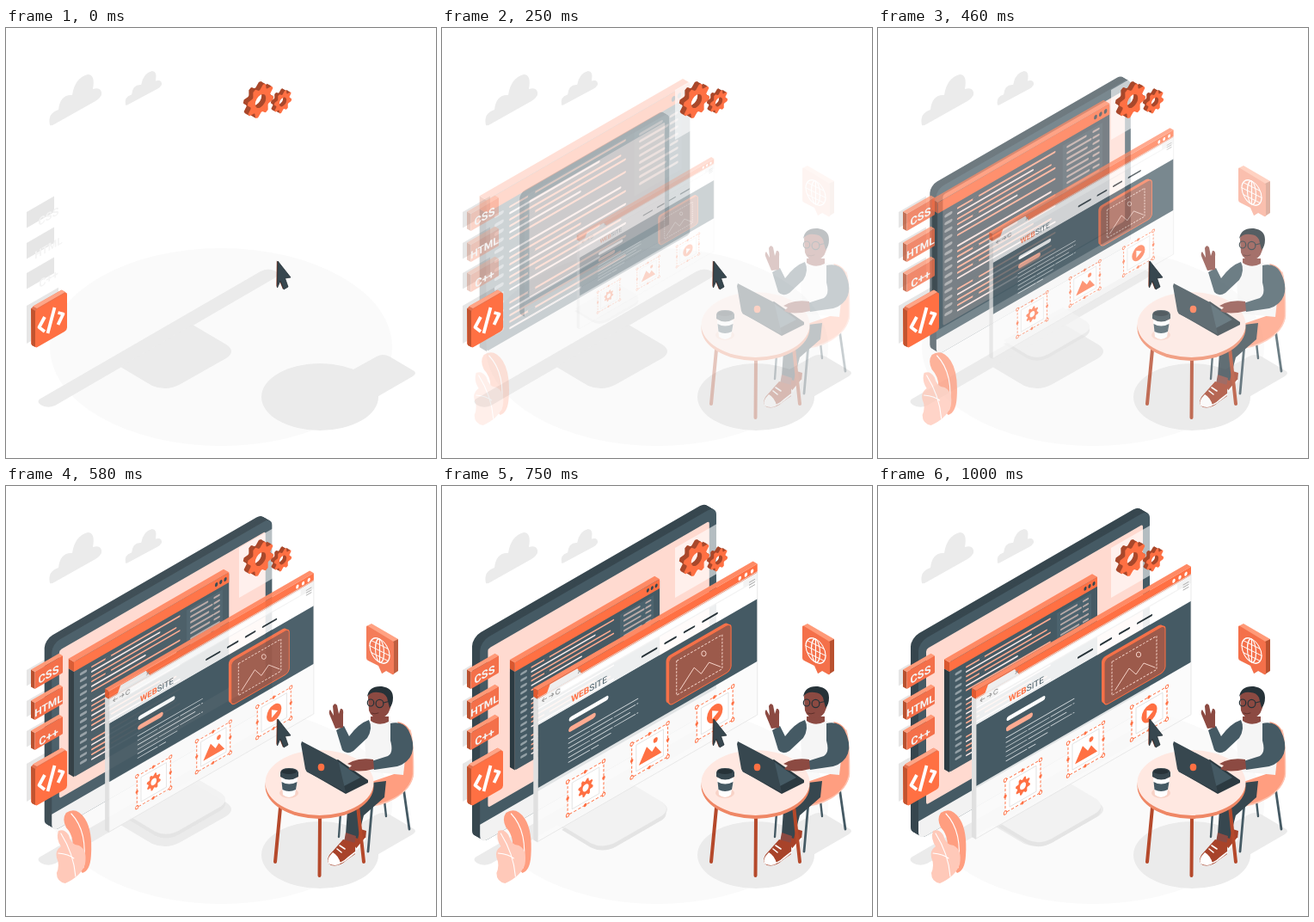
Write an HTML page that moves like this. It is 500x500 px and loops after 1.04 s.

```html
<!DOCTYPE html>
<html lang="en">
<head>
<meta charset="utf-8">
<title>Website building</title>
<style>
html, body { margin: 0; width: 100%; height: 100%; overflow: hidden; background: #fff; }
svg { display: block; width: 100vw; height: 100vh; }
text { font-family: Roboto, Arial, sans-serif; font-weight: 700; }
</style>
</head>
<body>
<svg id="stage" viewBox="0 0 500 500"></svg>
<script>
const ORANGE = '#ff7043', RUST = '#b5492b', PEACH = '#ffab91', DARK = '#37474f', SLATE = '#455a64',
      SKIN = '#8c4a42', SHADE = '#ebebeb', SLOPE = 0.577;

const path = (d, fill, extra = '') => `<path d="${d}" fill="${fill}" ${extra}/>`;
const line = (d, stroke, width, extra = '') =>
  path(d, 'none', `stroke="${stroke}" stroke-width="${width}" stroke-linecap="round" stroke-linejoin="round" ${extra}`);
const rect = (x, y, w, h, fill, extra = '') =>
  `<rect x="${x}" y="${y}" width="${w}" height="${h}" fill="${fill}" ${extra}/>`;
const oval = (x, y, rx, ry, fill, extra = '') =>
  `<ellipse cx="${x}" cy="${y}" rx="${rx}" ry="${ry}" fill="${fill}" ${extra}/>`;
const group = (id, body) => `<g id="${id}">${body}</g>`;
const move = (x, y, body) => `<g transform="translate(${x} ${y})">${body}</g>`;
// Places a flat drawing on the wall that rises to the right.
const wall = (x, y, body) => `<g transform="matrix(1 ${-SLOPE} 0 1 ${x} ${y})">${body}</g>`;

// Left side and top of a block whose front face starts at x, y.
function edges(x, y, w, h, d, side, top) {
  const k = d * SLOPE, up = w * SLOPE;
  return path(`M${x} ${y}l${-d} ${-k}v${h}l${d} ${k}z`, side) +
         path(`M${x} ${y}l${-d} ${-k}l${w} ${-up}l${d} ${k}z`, top);
}

// Stacks copies of a shape to give it depth.
function extrude(x, y, depth, shape) {
  let out = '';
  for (let i = depth; i >= 0; i--) out += shape(x - i, y - i * SLOPE, i === 0);
  return out;
}

function gearPath(R) {
  let d = '';
  for (let i = 0; i < 32; i++) {
    const r = i % 4 < 2 ? R : R * 0.74;
    const a = (i + 0.9 + [0.1, 0.1, 0.2, -0.2][i % 4]) * Math.PI / 16;
    d += (i ? 'L' : 'M') + (r * Math.cos(a)).toFixed(2) + ' ' + (r * Math.sin(a)).toFixed(2);
  }
  const h = R * 0.4;
  return `${d}ZM${h} 0A${h} ${h} 0 1 0 ${-h} 0A${h} ${h} 0 1 0 ${h} 0Z`;
}
const gear = (x, y, R, depth) => extrude(x, y, depth, (gx, gy, front) =>
  `<g transform="matrix(.866 -.5 0 1 ${gx} ${gy})">${path(gearPath(R), front ? ORANGE : '#a9482b', 'fill-rule="evenodd"')}</g>`);

function backdrop() {
  const cloud = path('M51 113Q48 99 61 95Q63 77 77 78Q80 58 95 54Q104 54 101 71Q112 68 111 78Q109 82 104 85L56 112Q53 114 51 113Z', SHADE);
  return oval(250, 371, 199, 115, '#fafafa') +
    path('M40 431L296 283Q305 278 314 283Q318 287 312 291L57 439Q48 443 40 438Q35 434 40 431Z', SHADE) +
    path('M133 394L217 345L256 368Q268 376 256 384L203 414Q187 423 170 416Z', SHADE) +
    oval(365, 429, 68, 39, SHADE) +
    path('M402 398L431 382Q438 378 446 382L473 398Q479 401 473 405L428 431Z', SHADE) +
    cloud + `<g transform="translate(139 50) scale(.7 .67) translate(-51 -54)">${cloud}</g>` +
    [214, 250, 285].map(y => wall(24, y, rect(0, 0, 32, 18.5, '#e6e6e6'))).join('') +
    wall(24, 323, rect(0, 0, 37, 44, '#e6e6e6'));
}

function monitor() {
  const foot = 'M140 391L222 345L254 364Q264 372 254 380L202 410Q187 418 173 411Z';
  return move(0, 5, path(foot, '#e4e4e4')) + path(foot, '#f2f2f2') +
    extrude(47, 182, 9, (x, y, front) => wall(x, y, rect(0, 0, 269, 230, front ? SLATE : DARK, 'rx="10"'))) +
    wall(47, 182,
      path('M0 208H269V220Q269 230 259 230H10Q0 230 0 220Z', '#f2f2f2') +
      rect(9, 13, 252, 181, '#ffdad0', 'rx="3"'));
}

function codeWindow() {
  let body = rect(0, 0, 172, 128, SLATE, 'rx="2"') + rect(0, 0, 172, 11, ORANGE) +
    rect(125, 15, 40, 54, '#546e7a', 'opacity=".45"');
  for (let y = 18; y < 122; y += 7.6) body += line(`M8 ${y}h5`, '#93a0a6', 3);
  for (let i = 0; i < 20; i++) {
    const y = 17 + i * 5.4, w = 97 - [0, 22, 4, 0, 38][i % 5];
    if (i % 8 === 6) continue;
    body += line(`M20 ${y}h${w}`, i % 3 === 1 ? '#fbe9e7' : PEACH, 1.8);
    if (i % 3 === 0) body += line(`M36 ${y}h4`, SLATE, 2.4);
  }
  for (let i = 0; i < 8; i++) {
    const y = 19 + i * 6;
    body += line(`M130 ${y}h${18 + i * 5 % 9}M156 ${y}h5`, '#b9aaa8', 2.2);
  }
  body += [158, 163, 168].map(x => oval(x, 5.5, 1.6, 2.2, DARK)).join('');
  return edges(83, 205, 172, 11, 6, '#d9572f', '#ff8a65') +
    path('M77 212.5L83 216V333L77 329.5Z', '#2c3a41') + wall(83, 205, body);
}

function selection(x, y, icon) {
  const dots = [[0, 0], [41, 0], [0, 38], [41, 38]].map(([a, b]) =>
    oval(a, b, 1.7, 1.9, '#fff', `stroke="${ORANGE}"`)).join('');
  const ticks = [[20, 0], [20, 38], [0, 19], [41, 19]].map(([a, b]) => oval(a, b, 1.7, 1.9, ORANGE)).join('');
  return wall(x, y, rect(0, 0, 41, 38, '#fff', `stroke="${ORANGE}" stroke-dasharray="3 2"`) +
    rect(5, 4, 31, 30, 'none', 'stroke="#ddd" stroke-width=".7"') + dots + ticks + icon);
}

function photoCard() {
  return extrude(263, 202, 3, (x, y, front) =>
      wall(x, y, rect(0, 0, 71, 54, front ? '#9c5a4b' : '#f4714a', `rx="5" ${front ? `stroke="${ORANGE}"` : ''}`))) +
    wall(264, 202, rect(8, 7, 52, 39, 'none', 'stroke="#ffe0d6" stroke-width=".9" stroke-dasharray="2.5 1.5"')) +
    line('M276 237L292 212L300 219L309 206L322 211', '#ffe0d6', 0.9) +
    oval(303, 196, 2.6, 3, 'none', 'stroke="#ffe0d6" stroke-width=".9"');
}

function website() {
  const w = 250;
  let page = rect(0, 9, w, 31, '#fff', 'opacity=".9"') + rect(0, 110, w, 62, '#fbfbfb', 'opacity=".86"') +
    rect(0, 0, w, 10, ORANGE) + path('M10 10L14 1H45L50 10Z', '#eee') +
    rect(0, 10, w, 9, '#f3f3f3') + rect(26, 11.5, 208, 6, '#fff') + rect(0, 40, w, 71, SLATE) +
    line('M46 4l3 3m0-3l-3 3', '#888', 0.7) +
    line('M5 14.5h5m-5 0l2-2m-2 2l2 2M13 14.5h5m-2-2l2 2l-2 2M25 13a2.4 2.6 0 1 0 0 3', '#999', 0.9) +
    [230, 237, 244].map(x => oval(x, 5, 1.7, 2.3, '#fff')).join('') +
    [22, 25, 28].map(y => line(`M241 ${y - 6}h6`, '#aaa', 1)).join('') +
    `<text x="38" y="35.5" font-size="10" fill="${ORANGE}">WEB<tspan fill="${SLATE}" font-weight="400">SITE</tspan></text>` +
    [[119, 16], [145, 12], [167, 11], [188, 16]].map(([x, l]) => line(`M${x} 30h${l}`, '#263238', 2.2)).join('') +
    line('M38 54h40', '#fff', 5) + line('M38 65.5h25', PEACH, 6);
  for (let i = 0; i < 6; i++)
    page += line(`M35 ${75 + i * 5.4}h${[79, 79, 70, 79, 48, 34][i]}`, '#d5dbde', 0.9, i % 2 ? 'stroke-dasharray="24 2"' : '');
  const smallGear = `<g transform="translate(20.5 18.5) scale(.87 1)">${path(gearPath(10), ORANGE, 'fill-rule="evenodd"')}</g>`;
  const hills = path('M8 29L17 13L23 22L27 18L34 29Z', ORANGE) + oval(27, 11, 2.5, 2.8, ORANGE);
  const play = oval(20.5, 19, 9, 10, ORANGE) + path('M17.5 14L25 19L17.5 24Z', '#fff');
  return edges(114, 238, w, 10, 5, '#e0592f', '#ff8a65') +
    path('M109 245L114 248V411L109 408Z', '#e0e0e0') +
    wall(114, 238, page) + wall(114, 238, rect(0, 9, w, 163, 'none', 'stroke="#e4e4e4" stroke-width=".7"')) +
    photoCard() + selection(148, 342, smallGear) + selection(221, 299, hills) + selection(295, 257, play);
}

const label = (x, y, size, words) =>
  wall(x, y, `<text font-size="${size}" fill="#f4f4f4" text-anchor="middle">${words}</text>`);

function tags() {
  return [216, 252, 287].map(y => edges(33.5, y, 32.5, 20, 4.5, '#b9512f', '#ff9a78') +
    wall(33.5, y, rect(0, 0, 32.5, 20, '#f4704a', 'rx="1"'))).join('');
}
const labels = () => label(49.5, 223.5, 12.8, 'CSS') + label(49.5, 259.5, 12, 'HTML') + label(49.5, 296, 12.8, 'C++');

function tile() {
  return extrude(34, 328, 5, (x, y, front) => wall(x, y, rect(0, 0, 37, 44.5, front ? ORANGE : '#e2714f', 'rx="3"'))) +
    path('M29 326L34 329V371L30 369Z', '#c2532f') + path('M31 323.5L65 304.5L69 307L36 326Z', '#ffa486') +
    line('M45 336L38.5 348L45 353M56.5 325L48.5 355M60.5 331L66.5 332.5L60.5 345', '#fff', 3.8, 'style="stroke-linecap:butt"');
}

function furniture() {
  return line('M440 366L442 384M389 380L387 408', SLATE, 2.4) +
    line('M426 368L421 425M462 350L469 399', SLATE, 2.8) +
    path('M455 274Q468 276 472 290L474 335Q472 352 452 363Q436 373 418 372L422 345L460 332L466 292Z', '#ff9e80') +
    line('M470 284Q474 300 473.5 335Q471 352 452 363Q436 372 420 372', '#ffc4b1', 1.5);
}

function person() {
  return path('M403 396L419 401L418 411L408 422L402 414Z', '#a8432a') + line('M418 410L408 422', '#fff', 2) +
    path('M442 343L410 347Q400 352 398 362L395 405L409 410L416 383L440 362Z', DARK) +
    path('M395 403L407 407L405 417L393 414Z', SKIN) +
    path('M392 411L376 429Q371 438 378 441Q388 443 396 435L406 428V415Z', '#a8432a') +
    path('M380 426Q372 434 375 439Q383 443 389 439Q387 430 380 426Z', '#fff') +
    line('M375 438Q388 442 397 433L406 426M388 418l6 4m-9 0l5 4', '#fff', 1.6) +
    path('M418 280Q428 270 444 272Q464 277 466 300L462 336L420 332Q416 300 418 280Z', '#f5f5f5') +
    path('M422 272Q427 282 420 293L404 308Q396 313 391 307L384 284L393 279L399 291Q410 276 422 272Z', SLATE) +
    path('M383 282L378 270Q374 262 377 260L381 267L380 256Q382 251 385 255L387 265L389 259Q393 258 392 266L392 281Z', SKIN) +
    path('M424 268H445V274Q434 280 424 273Z', SKIN) +
    path('M421 246Q421 236 434 236Q449 238 448 252Q447 266 437 270Q425 271 422 261Z', SKIN) +
    path('M420 245Q422 232 437 233Q450 235 450 246Q450 254 446 258L443 246Q440 240 433 240Q424 239 420 245Z', '#263238') +
    oval(424, 252, 3.7, 4, 'none', 'stroke="#263238" stroke-width="1.2"') +
    oval(434.5, 253, 4.4, 4.6, 'none', 'stroke="#263238" stroke-width="1.2"') +
    line('M439 252L447 250', '#263238', 1.2) + line('M425 264Q429 266 433 264', '#5e2f2a', 1);
}

function table() {
  return line('M319 374L313 437M409 372L416 437M365 384L364.5 453', RUST, 4) +
    oval(364.5, 349, 63, 38, '#ef8765') + oval(364.5, 345, 63, 38, '#ffe8e1') +
    oval(329, 357, 11, 6, '#f8d2c6') +
    path('M320 340L322 359Q329 365 336 359L339 340Z', '#fff') +
    path('M320.5 344Q329 349 338.5 344L337 353Q329 357 321.5 353Z', SLATE) +
    path('M319 333Q320 328 329 328Q339 328 340 333V338Q329 345 319 338Z', DARK) + oval(329, 332, 9, 3, '#263238') +
    path('M350 332L386 318L421 342V345L395 358Z', '#2c3a41') + path('M365 331L387 321L412 339L393 349Z', SLATE) +
    path('M344 297L384 318Q386 319 387 322L395 356L351 333Q349 332 348 329L343 300Z', DARK) +
    oval(366.5, 327, 3.8, 4.2, ORANGE) +
    path('M447 276Q462 273 468 284Q476 299 472 311Q468 322 455 326L428 330L425 320L444 314Q451 310 447 296Z', SLATE) +
    path('M427 318Q413 316 403 320L397 323L402 325L398 329Q408 334 428 329Z', SKIN);
}

function bubble() {
  const globe = oval(0, 0, 11.5, 13.5, 'none') + oval(0, 0, 5, 13.5, 'none') +
    line('M-11.5 0H11.5M0 -13.5V13.5M-9.5 -7H9.5M-9.5 7H9.5', '#fff', 1.2);
  return path('M419 163L425 160L456 178L450 182Z', '#ff9a78') +
    path('M450 181L456 178V215L450 219Z', '#b9512f') + path('M437 218L443 214L438 211Z', RUST) +
    path('M419 164Q419 162 421 163L449 180Q451 181 451 183V218Q451 220 449 219L442 215L437 218L433 209L421 203Q419 202 419 200Z', '#f4704a') +
    `<g transform="matrix(1 .5 0 1 434.5 191.5)" stroke="#fff" stroke-width="1.2">${globe}</g>`;
}

function plant() {
  return path('M73 380Q85 372 95 387Q104 401 102 430Q101 447 92 450L77 432Q86 411 73 397Q68 387 73 380Z', '#ff9e80') +
    line('M79 381Q99 402 93 444', '#fff', 1.1) +
    path('M64 401Q71 398 76 406Q79 418 88 418Q98 423 95 440Q90 454 72 462Q62 460 62 450Q66 441 62 432Q60 424 67 419Q61 410 64 401Z', '#ffc9b9') +
    line('M67 404Q82 428 84 454M64 427Q76 428 82 433', '#fff', 1.1);
}

function cursor() {
  const shape = 'M316 271L331 290L324.5 291L328 301L323 304L319 294L315.5 302Z';
  return move(-1.2, -0.6, path(shape, '#8a4430')) + path(shape, DARK, 'stroke="#263238" stroke-width=".8"');
}

const stage = document.getElementById('stage');
stage.innerHTML = backdrop() + group('screen', monitor()) + group('code', codeWindow()) +
  wall(271, 72, rect(0, 0, 50, 58, '#fff', 'opacity=".6"')) +
  group('tags', tags()) + labels() + tile() + group('site', website()) +
  gear(296, 85, 18, 5) + gear(322, 86, 12, 4) + cursor() +
  group('plant', plant()) + group('desk', furniture() + person() + table()) + group('bubble', bubble());

const part = Object.fromEntries(['screen', 'code', 'site', 'tags', 'plant', 'desk', 'bubble']
  .map(id => [id, document.getElementById(id)]));

const LOOP = 1040, STEP = 41.6, PEAK = 765;
const clamp = v => Math.max(0, Math.min(1, v));
const ease = v => (1 - Math.cos(Math.PI * clamp(v))) / 2;
const zoom = (el, s, x, y) =>
  el.setAttribute('transform', `translate(${x} ${y}) scale(${s}) translate(${-x} ${-y})`);

function draw(now) {
  // Motion runs at 24 pictures a second.
  const t = Math.min(24, Math.floor((now % LOOP + 3) / STEP)) * STEP;
  const p = ease(t / PEAK);
  const s = 0.5 + 0.522 * p - 0.022 * ease((t - PEAK) / (1000 - PEAK));
  zoom(part.screen, s, 177.5, 218);
  zoom(part.code, 2 - s, 166, 218);
  zoom(part.site, s, 236.5, 249);
  part.plant.setAttribute('transform', `translate(${-65 * (1 - s)} 0)`);
  for (const el of [part.screen, part.code, part.site]) el.style.opacity = clamp(p * 1.1);
  for (const el of [part.tags, part.desk, part.plant]) el.style.opacity = clamp(p * 1.2);
  part.bubble.style.opacity = clamp((t / 600) ** 3);
}

const start = performance.now();
function tick() {
  draw(performance.now() - start);
  requestAnimationFrame(tick);
}
draw(0);
requestAnimationFrame(tick);
</script>
</body>
</html>
```
